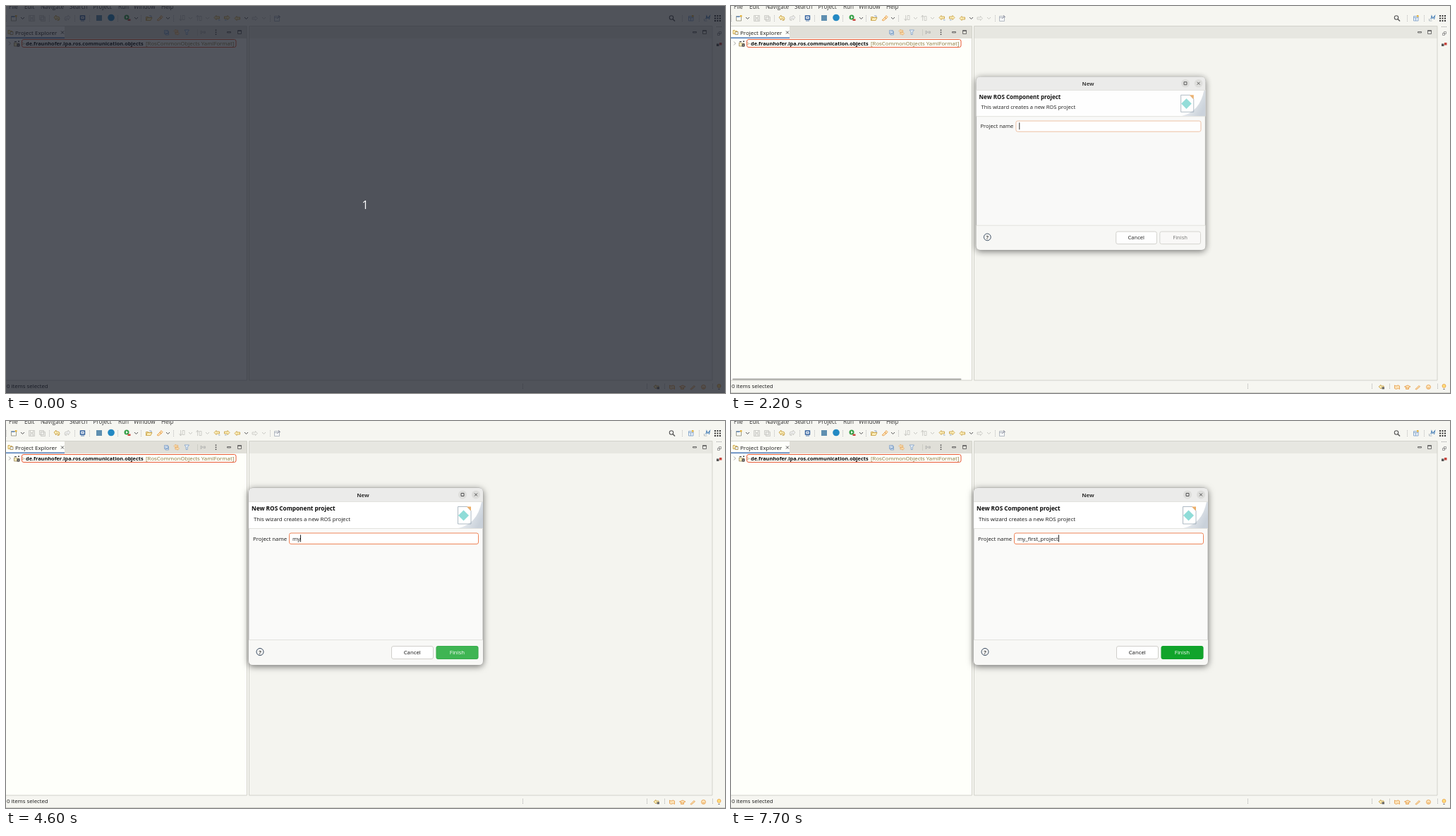
Write an HTML page that moves like this. It is 1019x549 px and loops after 8000 ms.

```html
<!DOCTYPE html>
<html lang="en">
<head>
<meta charset="utf-8">
<title>New project wizard</title>
<style>
html, body { margin: 0; width: 100%; height: 100%; overflow: hidden; background: #f6f6f1; }
svg { display: block; }
text { font: 7.8px "Open Sans", "Noto Sans", sans-serif; fill: #161616; white-space: pre; }
.bold { font-weight: 700; fill: #080808; }
.menu text { font-size: 8.1px; fill: #333; }
.mid { text-anchor: middle; }
.line { fill: none; stroke-width: 1; }
.icons { stroke-width: .8; }
.grey { stroke: #c6c6c1; }
.dark { stroke: #555; }
.gold { stroke: #c39a3c; fill: #fdeeb8; }
.blue { stroke: #7c9dc4; fill: #e9f1f9; }
.orange { stroke: #e59a45; fill: #fce3b8; }
#shadow { filter: drop-shadow(0 2px 5px #0008); }
</style>
</head>
<body>
<svg width="1019" height="549" viewBox="0 0 1019 549">
  <defs>
    <linearGradient id="sweep" x2="1" y2=".6">
      <stop stop-color="#fff"/><stop offset=".5" stop-color="#e5e9ee"/><stop offset="1" stop-color="#c9d1da"/>
    </linearGradient>
    <path id="arrow" d="M-4 0l3-3v1.500h4.500v3h-4.500v1.500z"/>
    <path id="curl" d="M-4-1l3-3v2h2q3 0 3 3t-3 2.500q1.500-1.500 1-2.500h-3v2z"/>
  </defs>

  <!-- workbench panels -->
  <path fill="#f6f6f1" d="M0 0h1019v549H0z"/>
  <path fill="#e0dfd8" d="M0 29h341v17H0z"/>
  <path fill="#e7e7e1" d="M345 29h656v17H345z"/>
  <path fill="#fefffa" d="M0 46h341v485H0zM0 29h83v16H0z"/>
  <path fill="#f4f4ef" d="M345 46h656v485H345z"/>
  <path class="line" stroke="#d2d2cb" d="M0 28.500h341.500v502.500H0M344.500 28.500h656.500v502.500H344.500zM0 548.500h1019"/>
  <path fill="#4a78b8" d="M0 44.500h83v1.500H0z"/>

  <g class="menu">
    <text x="4" y="4">File</text><text x="26" y="4">Edit</text><text x="49" y="4">Navigate</text>
    <text x="90" y="4">Search</text><text x="123.500" y="4">Project</text><text x="159" y="4">Run</text>
    <text x="181" y="4">Window</text><text x="220" y="4">Help</text>
  </g>

  <!-- toolbar -->
  <path id="separators" class="line" stroke="#bbb" stroke-dasharray="1 1"/>
  <path id="chevrons" class="line dark"/>
  <path id="paleChevrons" class="line grey"/>
  <g class="line icons">
    <path stroke="#8a8a78" fill="#fbfbf4" d="M7.500 14.500h7v6.500h-7z"/>
    <path fill="#6c92c2" d="M7.500 14.500h5v1.500h-5z"/><path fill="#e5b33a" d="M13 13h2.500v2.500H13z"/>
    <path class="grey" fill="#ecece8" d="M32.500 13.500h8v8h-8zM34.500 13.500v3h4v-3M34.500 21v-3h4v3M47.500 13.500h6v6h-6zM49.500 15.500h6v6h-6z"/>
    <use href="#curl" class="gold" x="72" y="17"/>
    <use href="#curl" class="grey" fill="#eee" transform="translate(87 17) scale(-1 1)"/>
    <path stroke="#2f5e9c" stroke-width="1.400" fill="#fff" d="M105.500 14h6v5h-6z"/>
    <path stroke="#2f5e9c" d="M107 16.500h3M106 21h5"/>
    <circle cx="171" cy="16" r="3.500" fill="#35a047"/><path fill="#fff" d="M170 14l3 2-3 2z"/>
    <path fill="#c8463e" d="M172.500 18.500h4v2.500h-4z"/>
    <path class="gold" d="M198.500 20.500v-5h3l1 1h4M198.500 20.500l2-4h6.500l-2 4z"/>
    <path stroke="#7993b8" d="M203 14h3v2"/>
    <path class="orange" d="M214 20l4-4 2 2-4 3zM218 16l2-2.500 2 2-2 2.500z"/>
    <path class="grey" d="M247.500 13v8M250 13.500h3v6h-3zM245.500 18l2 3 2-3M271.500 21v-8M274 14.500h3v6h-3zM269.500 16l2-3 2 3"/>
    <use href="#arrow" class="gold" x="299" y="16.500"/><use href="#arrow" class="gold" transform="translate(313 16.500) scale(-1 1)"/>
    <path stroke="#7c9dc4" d="M301 20h2.500M310 20h2.500"/>
    <use href="#arrow" class="gold" x="328" y="17.500"/>
    <use href="#arrow" class="grey" fill="#f3f3ee" transform="translate(352.500 17.500) scale(-1 1)"/>
    <path stroke="#a5adb6" fill="#f4f6f7" d="M380.500 14.500h7v7h-7zM380 16.500h8"/>
    <path stroke="#889" d="M384 18l4-4M386 13l3 3"/>
    <circle cx="943" cy="16.500" r="2.700" stroke="#555" stroke-width="1.100"/><path stroke="#555" stroke-width="1.400" d="M945 18.500l3 3"/>
    <path class="blue" d="M967.500 14.500h6.500v6.500h-6.500zM967 16.500h7M970.500 17v4"/><path fill="#e5b33a" d="M972 13h2.500v2.500H972z"/>
    <path stroke="#4c82b8" stroke-width="1.100" d="M992 19l1-5 1.500 3.500 3-3.500-1 5"/><path stroke="#a0abb5" d="M989.500 18v3h4"/>
  </g>
  <path fill="#5f8fb0" d="M128 13h8v8h-8z"/>
  <circle cx="149" cy="16.500" r="4.800" fill="#2389c3"/>
  <path id="grid" fill="#333"/>

  <!-- project view -->
  <g class="line icons">
    <path class="gold" d="M3 34.500h2.500l1 1h2v4H3z"/><path class="blue" d="M6 36.500h4v4H6z" style="stroke:#a58a4e"/>
  </g>
  <text x="13" y="40.500" style="font-size:8px">Project Explorer</text>
  <path class="line dark" d="M78 35.500l4 4m0-4l-4 4"/>
  <g class="line icons">
    <path class="blue" d="M224.500 34.500h5v5h-5zM226 36h4.500v5H226zM227 38.500h2.500"/>
    <use href="#arrow" class="orange" transform="translate(241 35.500) scale(.75)"/>
    <use href="#arrow" class="orange" transform="translate(242.500 39) scale(-.75 .75)"/>
    <path class="blue" d="M253 34h6.500l-2.300 3v3.500h-2V37z"/>
    <path stroke="#b5b5b0" fill="#ccc" d="M276 35l3 2-3 3zM280 36h2.500v2.500H280z"/>
    <path class="dark" d="M313.500 36.500h5v1.500h-5zM973.500 36.500h5v1.500h-5zM328.500 34.500h5v5h-5zM328 35.500h6M987.500 34.500h5v5h-5zM987 35.500h6"/>
    <path stroke="#c9c9c2" d="M271.500 33v9"/>
    <path stroke="#444" stroke-width="1.500" stroke-dasharray="1.500 1.500" d="M297.500 33.500v8"/>
    <path stroke="#888" d="M4 50.500l2.500 2.500-2.500 2.500"/>
    <path class="gold" d="M11.500 52h3l1 1h3v4h-7z" style="stroke:#9b8a60"/>
  </g>
  <path fill="#4a4a4a" d="M15.500 53.500h4v4h-4zM12 50h3v1h-3zM17 49.500h2V51h-2z"/><path fill="#fff" d="M17 55h1v1h-1z"/>
  <rect class="line" x="22.500" y="47.500" width="303.500" height="11" rx="2.500" stroke="#e95b37"/>
  <text x="22.500" y="55.500" style="fill:#94824b">&gt;</text>
  <text class="bold" x="28" y="55.500" style="font-size:7.36px">de.fraunhofer.ipa.ros.communication.objects</text>
  <text x="198" y="55.500" style="fill:#8a773c">[RosCommonObjects YamlFormat]</text>
  <rect id="scrollbar" x="2" y="528.500" width="324.500" height="2" rx="1" fill="#a6a6a2"/>

  <!-- right trim and status bar -->
  <path class="line" stroke="#999" stroke-dasharray="1 1" d="M1007 29.500h8"/>
  <path class="line icons" stroke="#888" d="M1010.500 36.500h3v3h-3zM1008.500 38.500h3v3h-3z"/>
  <path fill="#555" d="M1007 53.500h3.500V57h-3.500z"/><path fill="#c8463e" d="M1011 52h3.500v3.500h-3.500z"/>
  <text x="1" y="542">0 items selected</text>
  <path class="line" stroke="#aaa" stroke-dasharray="1 1" d="M732.500 536v8M908.500 536v8M933.500 536v8M1001.500 536v8"/>
  <g class="line icons orange">
    <path d="M940.500 538l2 1 3-1 2 1v4.500l-2-1-3 1-2-1zM954.500 540l4.500-2 4 2-4 2zM956.500 541v2.500h4V541M970 543.500l5-5 1.500 1.500-5 4z"/>
    <circle cx="988.500" cy="540.500" r="3"/><path d="M987 541.500q1.500 1 3 0"/>
    <circle cx="1010.500" cy="539" r="2.500" fill="#ffe07a"/>
  </g>
  <path class="line dark" d="M1009.500 543.500h2"/>
  <path class="line icons gold" d="M918 540l3-2.500v1.500h4v3h-4v1z"/><path fill="#666" d="M922.500 540.500h3.500v3h-3.500z"/>

  <!-- wizard -->
  <g id="dialog">
    <rect id="shadow" x="344" y="95" width="332" height="251" rx="6" fill="#fafaf9" stroke="#a5a5a2" stroke-width=".8"/>
    <path fill="#ebebea" d="M344 115v-14q0-6 6-6h320q6 0 6 6v14z"/>
    <path fill="#fff" d="M344 114.500h332v37.500H344z"/>
    <path fill="url(#sweep)" d="M676 114.500v37.500h-35q27-6 33-37.500z"/>
    <path fill="#f8f8f6" d="M344 310.500h332V340q0 6-6 6H350q-6 0-6-6z"/>
    <path class="line" stroke="#e2e2de" d="M344 114.500h332M344 152.500h332M344 310.500h332"/>
    <text class="bold mid" x="506" y="107.500" style="fill:#333">New</text>
    <g fill="#dddddb"><circle cx="647" cy="104.500" r="6"/><circle cx="666" cy="104.500" r="6"/></g>
    <path class="line dark" d="M645 102.500h4v4h-4zM664 102.500l4 4m0-4l-4 4"/>
    <text class="bold" x="348" y="127" style="font-size:8.250px">New ROS Component project</text>
    <text x="351" y="141.500">This wizard creates a new ROS project</text>
    <path class="line icons" stroke="#9aa9b5" fill="#f2f5f6" d="M640.500 121.500h13l5.500 6v18.500h-18.500z"/>
    <path fill="#ecae68" d="M653 121.500h6v6z"/>
    <path fill="#8fdcd8" d="M641 134l7.500-7.500 7.500 7.500-7.500 7.500z"/>
    <text x="350" y="169.500">Project name</text>
    <rect id="field" x="401.500" y="159" width="268" height="15.500" rx="2.500" fill="#fff"/>
    <text id="entry" x="406" y="169.500"></text>
    <path id="caret" class="line" stroke="#222" d="M.5 161.500v10"/>
    <circle class="line" cx="360" cy="327.500" r="5" stroke="#34465c"/>
    <text class="mid" x="360" y="330.500" style="font-weight:600">?</text>
    <rect x="546.500" y="319.500" width="59" height="18" rx="2.500" fill="#fff" stroke="#d0cfcb"/>
    <text class="mid" x="575.700" y="331">Cancel</text>
    <rect x="610" y="319.500" width="59" height="18" rx="2.500" fill="#faf9f8" stroke="#d3d2ce"/>
    <rect id="green" x="609.500" y="319" width="60" height="19" rx="3" fill="#11a42b"/>
    <text id="finish" class="mid" x="639.500" y="331">Finish</text>
  </g>

  <g id="countdown">
    <path fill="#191d28" opacity=".75" d="M0 0h1019v549H0z"/>
    <text class="mid" x="509" y="287.500" style="font-size:16px;fill:#fff">1</text>
  </g>
</svg>
<script>
const $ = id => document.getElementById(id);
const marks = (id, xs, shape) => $(id).setAttribute('d', xs.map(x => `M${x} ${shape}`).join(''));
marks('separators', [.5, 61.5, 97.5, 118.5, 158.5, 191.5, 237.5, 374.5, 958.5, 982.5], '13v9');
marks('chevrons', [21, 182, 227, 338], '16l2.500 2.500 2.500-2.500');
marks('paleChevrons', [259, 283, 363], '16l2.500 2.500 2.500-2.500');
marks('grid', [1004, 1007.5, 1011], '13h2v2h-2zm0 3.500h2v2h-2zm0 3.500h2v2h-2z');

const NAME = 'my_first_project';
const KEYS = [4400, 4500, 4900, 5300, 5500, 5500, 5700, 5800, 6500, 6800, 7000, 7100, 7300, 7400, 7600, 7700];
// Each step is [start time, value]; the latest one reached holds.
const BAR = [[0, 0], [1000, .4], [1100, .7], [1300, .85], [1700, 1], [3000, .75], [3100, .5], [3300, .25], [3400, 0]];
const CARET = [[0, 1], [3000, .1], [3100, 0], [3300, .5], [3400, 1], [4100, 0], [4400, 1], [6000, .4], [6100, 0], [6500, 1]];
const GREEN = [[0, 0], [4500, .45], [4600, .8], [4700, .95], [4800, 1]];
const at = (steps, t) => steps.filter(([start]) => start <= t).pop()[1];
const fade = (id, value) => $(id).setAttribute('opacity', value);

function draw(t) {
  const opening = t < 2300;
  fade('countdown', t < 100 ? 1 : 0);
  fade('scrollbar', at(BAR, t));
  fade('dialog', t < 2200 ? 0 : opening ? .95 : 1);
  $('dialog').setAttribute('transform', opening ? 'translate(510 343) scale(.978) translate(-510 -343)' : '');
  $('field').style.stroke = opening ? '#edbd9f' : '#ee8458';

  const entry = $('entry');
  entry.textContent = NAME.slice(0, KEYS.filter(k => k <= t).length);
  const end = Math.round(406 + entry.getComputedTextLength());
  $('caret').setAttribute('transform', `translate(${end})`);
  fade('caret', at(CARET, t));

  const green = at(GREEN, t);
  fade('green', green);
  $('finish').style.fill = green ? '#fff' : opening ? '#6f6f6d' : '#a0a09d';
}

const start = performance.now();
function tick() {
  draw((performance.now() - start) % 8000);
  requestAnimationFrame(tick);
}
tick();
</script>
</body>
</html>
```
